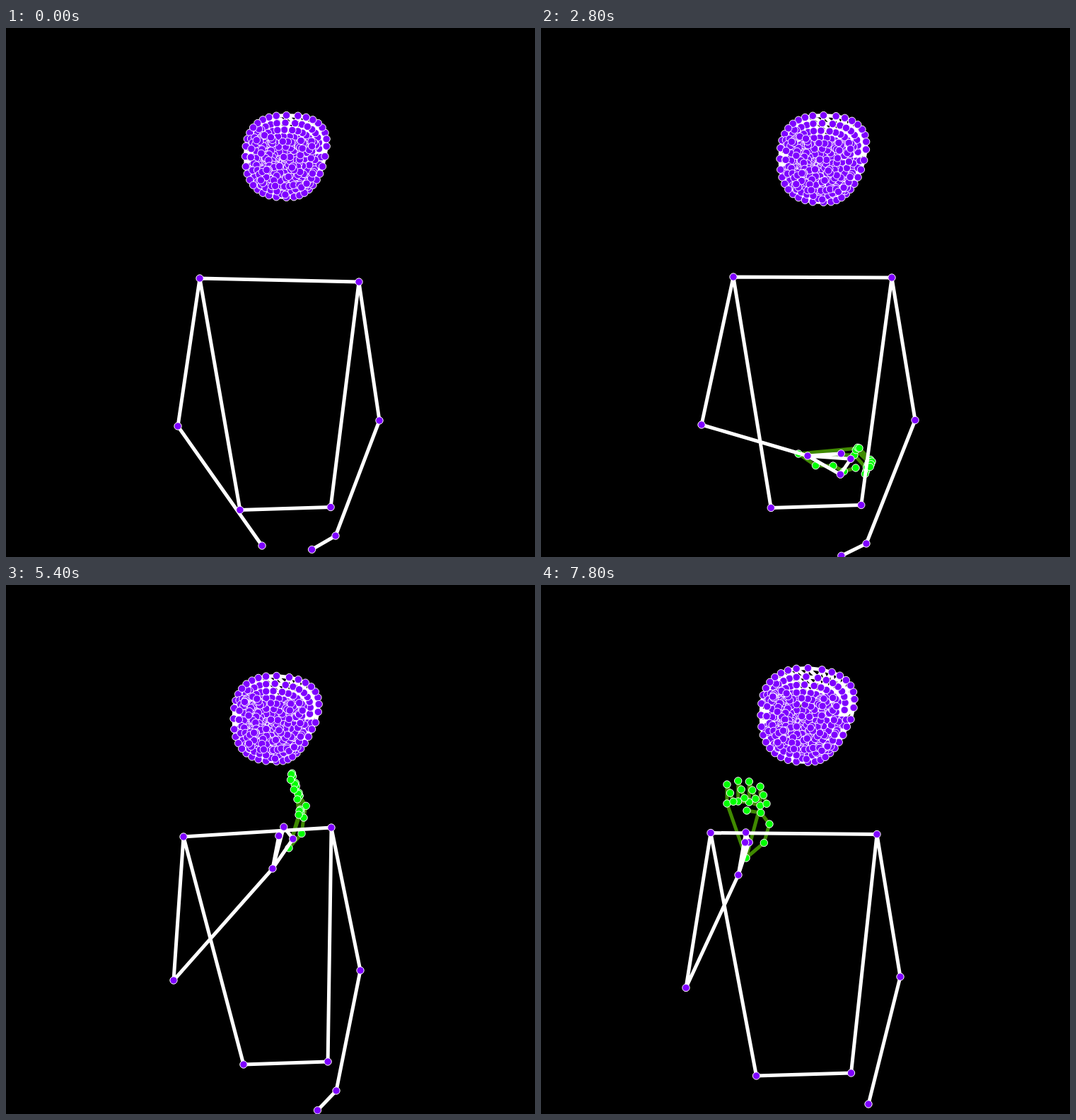
Recreate the animation shown at these times as an HTML page. Size 748 by 748 pixels, loop 8 s.

```html
<!DOCTYPE html>
<html lang="en">
<head>
<meta charset="utf-8">
<title>Pose tracking</title>
<style>
html, body { margin: 0; width: 100%; height: 100%; overflow: hidden; background: #000; }
svg { display: block; width: 100%; height: 100%; }
path { fill: none; stroke: #fff; stroke-width: 5; }
circle { fill: #7f00ff; stroke: #fff; stroke-width: 1; }
#hand path { stroke: #408a00; }
#hand circle { fill: #0f0; }
</style>
</head>
<body>
<svg viewBox="0 0 748 748">
  <g id="hand"></g>
  <g id="body"></g>
  <g id="face"></g>
</svg>
<script>
const LOOP = 8000, STEP = 200, SIZE = 748, HAND_START = 2400;
const TIMES = [0, 1600, 2800, 3600, 5400, 6600, 7800];

// Vector helpers
const add = (p, q, k = 1) => [p[0] + q[0] * k, p[1] + q[1] * k];
const mix = (p, q, k) => [p[0] + (q[0] - p[0]) * k, p[1] + (q[1] - p[1]) * k];
const side = ([x, y]) => [-y, x];
const bulge = (p, q, k, bend) => add(mix(p, q, k), side(add(q, p, -1)), bend);
const power = (v, e) => Math.sign(v) * Math.abs(v) ** e;
const noise = n => { const v = Math.sin(n * 127.1 + 11.7) * 43758.5453; return v - Math.floor(v); };

// Key poses, aligned with the last entries of TIMES
const track = (...rows) => rows.map((r, i) => [TIMES[TIMES.length - rows.length + i], ...r]);

// Monotone cubic through rows of [time, ...values]
function sample(rows, t) {
  const last = rows.length - 1;
  if (t <= rows[0][0]) return rows[0].slice(1);
  if (t >= rows[last][0]) return rows[last].slice(1);
  const i = rows.findIndex(r => r[0] > t) - 1;
  const h = rows[i + 1][0] - rows[i][0], s = (t - rows[i][0]) / h, r = 1 - s;
  const rate = (k, c) => (rows[k + 1][c] - rows[k][c]) / (rows[k + 1][0] - rows[k][0]);
  const slope = (k, c) => {
    if (k === 0 || k === last) return rate(Math.min(k, last - 1), c);
    const a = rate(k - 1, c), b = rate(k, c);
    return a * b > 0 ? 2 * a * b / (a + b) : 0;
  };
  return rows[i].slice(1).map((p, n) => {
    const c = n + 1, q = rows[i + 1][c];
    return p * r * r * (1 + 2 * s) + q * s * s * (3 - 2 * s)
      + h * s * r * (slope(i, c) * r - slope(i + 1, c) * s);
  });
}

// Shoulder line: centre, width, tilt
const chest = track([386.5, 356.5, 225, 5], [387.5, 355, 224, 5.5], [384, 352.5, 224, 1],
  [371, 358, 215, -10], [355.5, 349.5, 209, -13], [350.5, 355.2, 231, -6.5], [357.5, 351.5, 235, 2]);
const pelvis = track([395, 679.5], [393, 675], [389, 676.5], [394.5, 686], [395.5, 676], [376, 681.5], [371.5, 692]);
const elbowL = track([243, 563], [243, 565], [227, 561], [240, 592], [237, 559], [198, 550], [205, 569.5]);
const elbowR = track([528, 555], [528, 555], [529, 554.5], [515.5, 561], [501, 545], [504, 543], [508, 554]);
const wristL = track([362, 732], [373, 727], [377, 605], [392, 478], [377, 401], [282, 354], [279, 410]);
const wristR = track([466, 718], [454, 728], [460, 729], [459, 734], [467, 715], [480, 709], [463, 734]);

// Palm: angle in degrees, thumb spread, offset of the tracked hand from the wrist
const palm = track([4, 23, -13, -3], [-58, 13, 19, -7], [-75, 17, 23, -29], [-85, 5, 3, -23], [-80, 7, 11, -24]);

// Hand shapes from the wrist: thumb joint, thumb tip, index and pinky knuckles,
// finger bone, reach of the fingertips, their lean
const flat = [49, 17, 81, 20, 79, 2, 86, -8, 18, 19, 0.4, -10];
const raised = [36, -41, 37, -74, 25, -63, -2, -56, 5, -21, 0.85, 2];
const edgeOn = [21, -43, 15, -74, 17, -52, 14, -47, -2, -22, 1.25, -7];
const curled = [33, -48, 1, -67, 20, -74, -27, -77, 0, -27, -0.9, 9];
const shapes = track(flat, raised, edgeOn, curled, curled);

// Face: centre and radius
const head = track([396.5, 181.5, 58], [401.5, 183.5, 62], [399.5, 185, 61.5], [396, 183.5, 57.5],
  [382.5, 189, 60.5], [377, 187, 64], [377.5, 184, 66.5]);

const f = v => v.toFixed(1);
const line = pts => 'M' + pts.map(p => f(p[0]) + ' ' + f(p[1])).join('L');
const dot = p => `<circle cx="${f(p[0])}" cy="${f(p[1])}" r="5.2"/>`;
const graph = (lines, dots) => `<path d="${lines.map(line).join('')}"/>` + dots.map(dot).join('');

function body(t) {
  const [x, y, width, tilt] = sample(chest, t);
  const hips = sample(pelvis, t);
  const [el, er, wl, wr] = [elbowL, elbowR, wristL, wristR].map(k => sample(k, t));
  const sl = [x - width / 2, y - tilt / 2], sr = [x + width / 2, y + tilt / 2];
  const hl = add(hips, [-0.285 * width, 2]), hr = add(hips, [0.285 * width, -2]);
  const swing = wr[0] - er[0];
  const tip = add(wr, [-18 + 0.25 * swing, 38 + 0.3 * swing]);
  const bones = [[sl, sr], [sl, el], [el, wl], [sr, er], [er, wr], [sl, hl], [sr, hr], [hl, hr]];
  const dots = [sl, sr, el, er, wl, wr, hl, hr];
  if (tip[1] < SIZE) {
    bones.push([wr, tip]);
    dots.push(tip);
  }
  if (t >= HAND_START) {
    const [angle, spread] = sample(palm, t), a = angle * Math.PI / 180;
    const u = [Math.cos(a), Math.sin(a)], v = side(u);
    const at = (along, across) => add(add(wl, u, along), v, across);
    const index = at(61, 0), thumb = at(48, spread), pinky = at(47, 5 - spread / 2);
    bones.push([wl, pinky], [wl, index], [wl, thumb], [index, thumb]);
    dots.push(index, thumb, pinky);
  }
  return graph(bones, dots);
}

function hand(t) {
  if (t < HAND_START) return '';
  const s = sample(shapes, t);
  const wrist = add(sample(wristL, t), sample(palm, t).slice(2));
  const at = i => add(wrist, [s[i], s[i + 1]]);
  const joint = at(0), tip = at(2), bone = [s[8], s[9]];
  const thumb = [wrist, bulge(wrist, joint, 0.55, 0.15), joint, bulge(joint, tip, 0.5, 0.2), tip];
  const fingers = [0, 1, 2, 3].map(i => {
    const arch = i % 3 ? 4 : 0;
    const knuckle = add(mix(at(4), at(6), i / 3), [0, -arch]);
    const middle = add(add(knuckle, bone), [0, -arch / 2]);
    const end = add(add(middle, bone, s[10]), [s[11], 0]);
    return [knuckle, middle, mix(middle, end, 0.5), end];
  });
  const knuckles = fingers.map(c => c[0]);
  return graph([thumb, ...fingers, [wrist, ...knuckles, wrist]], [...thumb, ...fingers.flat()]);
}

const RINGS = [1, 0.84, 0.69, 0.55, 0.44, 0.33, 0.22, 0.12], N = 36, INNER = 0.4;

function face(t) {
  const [cx, cy, size] = sample(head, t);
  const q = Math.min(1, Math.max(0, (t - 1200) / 4000)), turn = q * q * (3 - 2 * q);
  const place = (x, y) => [cx + x * size, cy + y * size];
  // Squarish oval whose right side narrows towards the chin
  const rim = Array.from({ length: N }, (_, i) => {
    const a = (i - 1) / N * 2 * Math.PI;
    const x = power(Math.sin(a), 0.8), y = -power(Math.cos(a), 0.8);
    if (x < 0) return place(x, y);
    return place(x * (1 - (0.2 + 0.1 * turn) * (y + 0.3)), y + 0.09 * turn * x * (y < 0));
  });
  const nose = place(-0.16 - 0.08 * turn, 0.14);
  const at = (u, k) => {
    const i = Math.floor(u);
    return mix(nose, mix(rim[i % N], rim[(i + 1) % N], u - i), k);
  };
  const dots = [nose], edges = [];
  RINGS.forEach((k, n) => {
    for (let i = 0; i < N; i += k < INNER ? 2 : 1) {
      const p = at(i, k), next = RINGS[n + 1];
      dots.push(p);
      if (k > INNER) edges.push([p, at(i + 1, k)], [p, at(i, next)], [p, at(i + 1, next)]);
    }
  });
  const oval = (x, y, rx, ry) => {
    for (let a = 0; a < 6.2; a += Math.PI / 9) {
      dots.push(place(x - 0.08 * turn + rx * Math.cos(a), y + ry * Math.sin(a)));
    }
  };
  oval(-0.5, -0.4, 0.16, 0.1);
  oval(0.5, -0.28, 0.22, 0.1);
  oval(-0.1, 0.5, 0.3, 0.1);
  oval(-0.1, 0.5, 0.18, 0.04);
  // Denser cheeks and jaw
  for (let i = 0; i < 130; i++) dots.push(at(8 + 25 * noise(i), 0.3 + 0.66 * noise(i + 500)));
  return graph(edges, dots.map((_, i) => dots[i * 89 % dots.length]));
}

const layers = { hand, body, face };
const start = performance.now();
let shown = -1;
function tick() {
  const t = Math.floor((performance.now() - start) % LOOP / STEP) * STEP;
  if (t !== shown) {
    shown = t;
    for (const id in layers) document.getElementById(id).innerHTML = layers[id](t);
  }
  requestAnimationFrame(tick);
}
tick();
</script>
</body>
</html>
```
